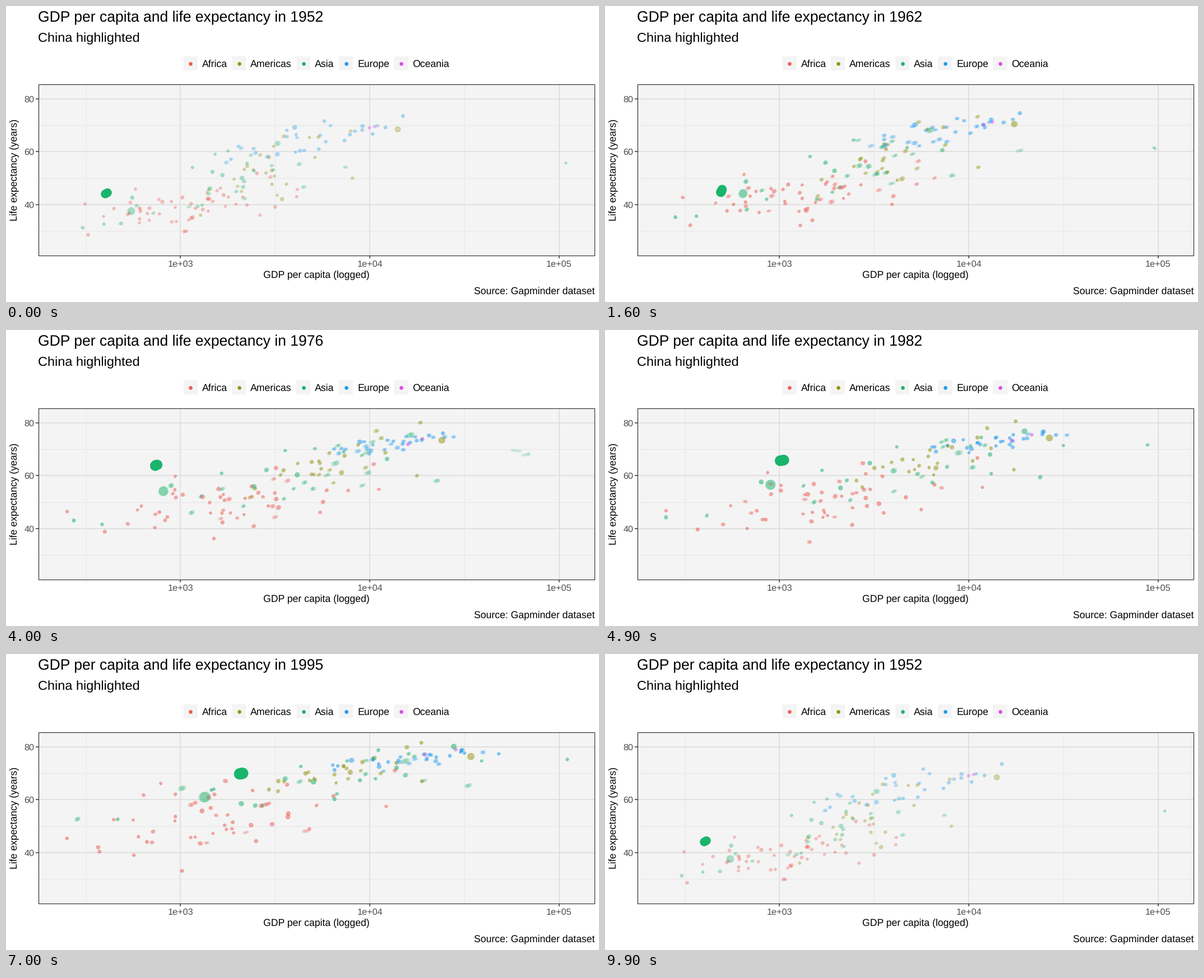
These frames come from a looping animation (1058 by 529 pixels, 10000 ms). A matplotlib script:

```python
import numpy as np
import matplotlib.pyplot as plt
from matplotlib.animation import FuncAnimation
from matplotlib.colors import to_rgba
from matplotlib.patches import Rectangle

W, H, DPI = 1058, 529, 100
PT = 72 / DPI
plt.rcParams["font.family"] = "Liberation Sans"
plt.rcParams["text.hinting"] = "none"

COLORS = {"Africa": "#f05c54", "Americas": "#969612", "Asia": "#1ab46c",
          "Europe": "#1c9cf0", "Oceania": "#dc4ce8"}
GREY, GRID, MINOR, DARK = "#f4f4f4", "#dedede", "#e7e7e7", "#333333"
YEARS = np.arange(1952, 2008, 5)
WAKE = 0.185 * np.arange(-2, 3)
ALPHA = 0.13

# Pace of the clock: frame number -> year, with one still step at 77
TICKS = [0, 16, 40, 58, 70, 77, 78, 84, 98]
CLOCK = [1952, 1962.05, 1976.9, 1987.7, 1995.2, 1999, 1999, 2002.15, 2007]

# Cloud of each continent: count, correlation, then the mean and spread
# of log10 gdp and of life expectancy in each of the stage years
STAGES = [1952, 1977, 1995, 2007]
CLOUDS = {
    "Africa": (52, 0.5, [(3.03, .27, 39, 5), (3.26, .34, 49.6, 6),
                         (3.18, .37, 52.5, 8), (3.27, .40, 55, 9)]),
    "Americas": (24, 0.65, [(3.48, .21, 53, 8.5), (3.80, .22, 64.5, 6.5),
                            (3.84, .21, 70.5, 4.5), (3.95, .24, 73.6, 4)]),
    "Asia": (29, 0.75, [(3.19, .32, 47, 8.5), (3.61, .45, 59.5, 9),
                        (3.78, .47, 67.5, 7.5), (3.86, .47, 70.5, 7)]),
    "Europe": (30, 0.8, [(3.68, .25, 64.5, 5), (4.11, .18, 72, 2.6),
                         (4.22, .26, 75.2, 2.7), (4.36, .23, 77.7, 2.6)]),
    "Oceania": (2, 0.9, [(4.01, .012, 69.2, .15), (4.24, .03, 72.9, .6),
                         (4.37, .06, 78, .5), (4.47, .07, 80.7, .5)]),
}

rng = np.random.default_rng(5)
gdp, life, pop, group = [], [], [], []


def px(g):
    return 311.4 + (g - 3) * 337.7


def py(years):
    return 354.8 - (years - 40) * 4.727


def add(name, g, l, p):
    gdp.append(g)
    life.append(l)
    pop.append(p)
    group.append(name)


def scores(n):
    """Standard scores that wander slowly without changing the cloud."""
    a, b = (np.clip((z - z.mean()) / z.std(), -2.1, 2.1)[:, None]
            for z in rng.normal(size=(2, n)))
    turn = 0.9 * (YEARS - 1952) / 55
    kinks = rng.normal(scale=0.07, size=(n, len(YEARS)))
    return a * np.cos(turn) + b * np.sin(turn) + kinks


def cloud(name, n, corr, stages):
    gm, gs, lm, ls = (np.interp(YEARS, STAGES, col) for col in zip(*stages))
    zg, zl = scores(n), scores(n)
    zl = corr * zg + np.sqrt(1 - corr ** 2) * zl
    growth = 1.3 if name == "Europe" else 2.9
    for g, l in zip(gm + gs * zg, lm + ls * zl):
        start = np.clip(rng.lognormal(1.7, 1), 0.4, 60)
        add(name, np.maximum(g, 2.4), np.clip(l, 28.5, 81.5),
            start * np.geomspace(1, growth, len(YEARS)))


def path(name, p0, p1, *keys):
    """A country that follows its own (year, gdp, life) keys."""
    t, g, l = zip(*keys)
    add(name, np.interp(YEARS, t, np.log10(g)), np.interp(YEARS, t, l),
        np.linspace(p0, p1, len(YEARS)))


for name, spec in CLOUDS.items():
    cloud(name, *spec)
path("Asia", .2, 2.5, (1952, 108382, 55.6), (1957, 113523, 58),
     (1967, 80895, 64.6), (1972, 109348, 67.7), (1982, 31354, 71.3),
     (2007, 47307, 77.6))
path("Americas", 158, 301, (1952, 13990, 68.4), (1977, 24073, 73.4),
     (2007, 42952, 78.2))
path("Asia", 86, 127, (1952, 3217, 63), (1977, 16610, 75.4),
     (1992, 26825, 79.4), (2007, 31656, 82.6))
path("Asia", 372, 1110, (1952, 547, 37.4), (1977, 813, 54.2),
     (1987, 977, 58.6), (2002, 1747, 62.9), (2007, 2452, 64.7))
# The highlighted country comes last, on top
path("Asia", 556, 1319, (1952, 400, 44), (1957, 576, 50.5), (1962, 488, 44.5),
     (1967, 613, 58.4), (1977, 741, 64), (1987, 1379, 67.3),
     (1997, 2289, 70.4), (2002, 3119, 72), (2007, 4959, 73))

xs, ys = px(np.array(gdp)), py(np.array(life))
radii = 2.4 + 8.3 * np.sqrt(np.array(pop) / 1319)
rgba = np.array([to_rgba(COLORS[name], ALPHA) for name in group])
rgba[-1, 3] = 1

fig = plt.figure(figsize=(W / DPI, H / DPI), dpi=DPI, facecolor="white")
ax = fig.add_axes([0, 0, 1, 1])
ax.set(xlim=(0, W), ylim=(H, 0))
ax.axis("off")


def text(x, y, s, size, color="black", **kw):
    return ax.text(x, y, s, fontsize=size * PT, color=color,
                   va=kw.pop("va", "baseline"), **kw)


def line(x, y, color, width):
    ax.plot(x, y, color=color, lw=width * PT, solid_capstyle="butt", zorder=1)


def box(x, y, w, h, fill, edge="none", z=0):
    ax.add_patch(Rectangle((x, y), w, h, fc=fill, ec=edge, lw=1.2 * PT, zorder=z))


def area(r):
    return (2 * (r - 0.5) * PT) ** 2


L, R, T, B = 57.8, 1049.7, 139.6, 445.8
box(L, T, R - L, B - T, GREY)
for g in (2.5, 3.5, 4.5):
    line([px(g)] * 2, [T, B], MINOR, 1.1)
for v in (30, 50, 70):
    line([L, R], [py(v)] * 2, MINOR, 1.1)
for g in (3, 4, 5):
    line([px(g)] * 2, [T, B], GRID, 1.8)
    line([px(g)] * 2, [B, B + 5], DARK, 1.5)
    text(px(g), 466, f"1e+0{g}", 16.2, "#4d4d4d", ha="center")
for v in (40, 60, 80):
    line([L, R], [py(v)] * 2, GRID, 1.8)
    line([L - 5, L], [py(v)] * 2, DARK, 1.5)
    text(50.5, py(v) + 5.9, str(v), 16.2, "#4d4d4d", ha="right")
box(L, T, R - L, B - T, "none", DARK, 5)

title = text(57, 28, "", 26.5)
text(57, 64.5, "China highlighted", 23.5)
text(554, 485.5, "GDP per capita (logged)", 17.6, ha="center")
text(15, 293, "Life expectancy (years)", 17.6, ha="center", va="center", rotation=90)
text(1050, 514, "Source: Gapminder dataset", 17.6, ha="right")
for (name, color), x in zip(COLORS.items(), (329.3, 415.7, 530.6, 606.5, 705)):
    box(x - 12.7, 90, 25.4, 25.4, GREY)
    ax.scatter([x], [102.6], s=area(3.3), c=color, linewidths=PT, zorder=3)
    text(x + 20.6, 109, name, 17.6)

dots = ax.scatter([], [], linewidths=0.8 * PT, zorder=3)


def sample(table, t):
    k = min(int((t - 1952) // 5), len(YEARS) - 2)
    f = (t - YEARS[k]) / 5
    return table[:, k] * (1 - f) + table[:, k + 1] * f


def draw(i):
    now = np.interp(i % 99, TICKS, CLOCK)
    times = [t for t in now + WAKE if 1952 <= t <= 2007]

    def stack(table):
        return np.concatenate([sample(table, t) for t in times])

    colors = np.tile(rgba, (len(times), 1))
    dots.set_offsets(np.column_stack([stack(xs), stack(ys)]))
    dots.set_sizes(area(stack(radii)))
    dots.set_facecolors(colors)
    dots.set_edgecolors(colors)
    title.set_text(f"GDP per capita and life expectancy in {int(now)}")
    return dots, title


anim = FuncAnimation(fig, draw, frames=100, interval=100, repeat=True,
                     repeat_delay=0, init_func=lambda: draw(0))
plt.show()
```
